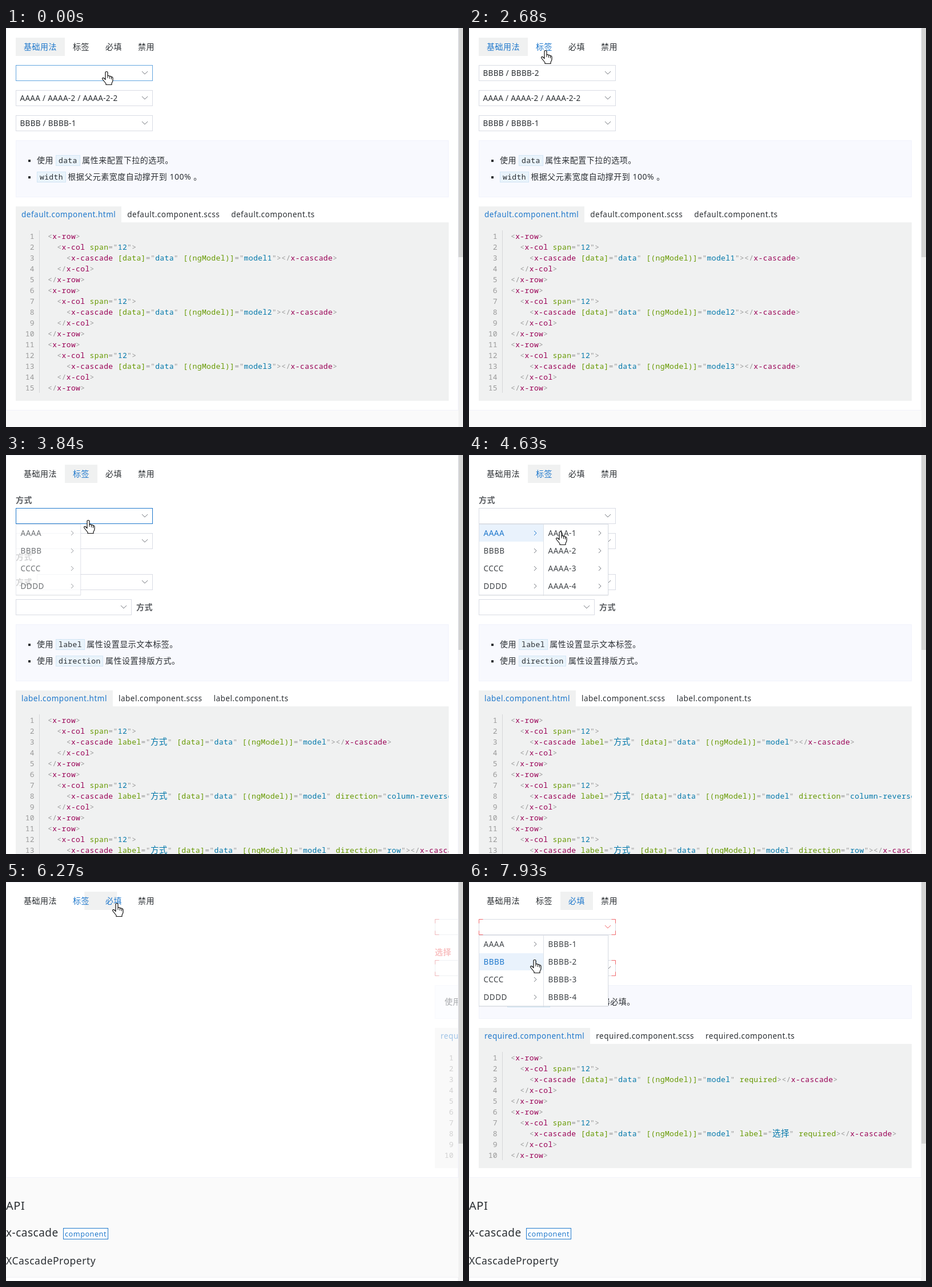
Write an HTML page with a canvas that moves like this. It is 800x700 px and loops after 8 s.

```html
<!DOCTYPE html>
<html lang="zh">
<head>
<meta charset="utf-8">
<style>
html, body { margin: 0; width: 100%; height: 100%; overflow: hidden; }
canvas { display: block; }
</style>
</head>
<body>
<canvas width="800" height="700"></canvas>
<script>
const ctx = document.querySelector('canvas').getContext('2d');
const BLUE = '#1f78cc', INK = '#2b2f33', RED = '#f0686c', LINE = '#d9dce4', PANEL = '#f0f1f1';
const GREY = '#999', ICON = '#74787f';
const sans = (size, weight = '') => `${weight} ${size}px "Noto Sans", "Noto Sans CJK SC", sans-serif`;
const mono = size => `${size}px "Noto Sans Mono", "Noto Sans CJK SC", monospace`;
const hasHan = s => /[\u3000-\u9fff]/.test(s);
const clamp = v => Math.min(1, Math.max(0, v));
const ease = u => u < .5 ? 4 * u ** 3 : 1 - (2 - 2 * u) ** 3 / 2;
const mix = (a, b, u) => a + (b - a) * u;

const tabs = [['基础用法', 17, 86], ['标签', 103, 57], ['必填', 160, 57], ['禁用', 217, 57]];
const model = '[data]="data" [(ngModel)]="model"';
const pages = [
  { name: 'default', noteY: 197, thumb: 402,
    boxes: [[17, 65, 240], [17, 109, 240], [17, 153, 240]], labels: [],
    values: t => [t < 1660 ? '' : 'BBBB / BBBB-2', 'AAAA / AAAA-2 / AAAA-2-2', 'BBBB / BBBB-1'],
    notes: ['使用`data`属性来配置下拉的选项。', '`width`根据父元素宽度自动撑开到 100% 。'],
    rows: [1, 2, 3].map(i => model.replace('model"', `model${i}"`)) },
  { name: 'label', noteY: 297, thumb: 342,
    boxes: [[17, 93, 240], [17, 137, 240], [54, 209, 203], [17, 253, 203]],
    labels: [['方式', 17, 79], ['方式', 17, 179], ['方式', 17, 223], ['方式', 228, 267]],
    values: t => Array(4).fill(t < 5240 ? '' : 'AAAA / AAAA-1 / AAAA-1-2'),
    notes: ['使用`label`属性设置显示文本标签。', '使用`direction`属性设置排版方式。'],
    rows: ['', 'column-reverse', 'row', 'row-reverse'].map(d =>
      `label="方式" ${model}` + (d && ` direction="${d}"`)) },
  { name: 'required', noteY: 181, thumb: 459, required: true,
    boxes: [[17, 65, 240], [17, 137, 240]], labels: [['选择', 17, 123]],
    values: () => ['', ''],
    notes: ['使用`required`属性设置选择器必填。'],
    rows: [`${model} required`, `${model} label="选择" required`] }
];
for (const p of pages) {
  p.code = p.rows.flatMap(a => ['<x-row>', '  <x-col span="12">',
    `    <x-cascade ${a}></x-cascade>`, '  </x-col>', '</x-row>']);
  p.fileY = p.noteY + (p.notes.length > 1 ? 100 : 59) + 16;
  p.codeH = 47 + 19 * (p.code.length - 1);
  p.bottom = p.fileY + 28 + p.codeH + 16;
}

const clicks = [2760, 6020];   // tab changes
const menus = [                // steps: [time, open path]
  { page: 0, open: 470, close: 1680, steps: [[860, [0]], [1230, [1]], [1540, [1, 1]]] },
  { page: 1, open: 3700, close: 5250, steps: [[4280, [0]], [4760, [0, 0]], [5040, [0, 0, 1]], [5240, [0, 0]]] },
  { page: 2, open: 7140, close: 9000, steps: [[7540, [0]], [7770, [1]]] }
];
const track = [
  [0, 176, 76], [69, 176, 76], [70, 170, 78], [470, 170, 78], [640, 166, 82], [900, 124, 102],
  [1120, 112, 114], [1240, 112, 114], [1430, 103, 133], [1560, 150, 137], [1640, 165, 139],
  [1960, 165, 139], [2300, 156, 95], [2620, 134, 39], [3260, 134, 39], [3580, 146, 108],
  [3700, 146, 110], [3840, 144, 114], [4160, 108, 126], [4290, 108, 126], [4630, 160, 134],
  [4760, 160, 134], [5150, 262, 160], [5390, 262, 160], [5560, 175, 61], [5640, 175, 61],
  [5880, 194, 37], [6730, 194, 37], [7000, 178, 87], [7140, 178, 87], [7400, 170, 90],
  [7620, 124, 110], [7930, 115, 136], [8000, 115, 136]
];
const hand = new Path2D('M-2 2.5Q-2 .5 0 .5T2 2.5V8Q5 7 5.5 9Q8 8 8.5 10Q11 9.5 11 12V16Q11 18 9 21V23.5H-1V21.5Q-3 19-7 14Q-8 12-6.5 11.5T-2 14.5Z');
const arrow = new Path2D('M.5 .5V16.5L4.2 13L6.8 19L9.3 18L6.8 12H12Z');

function rect(x, y, w, h, fill, stroke) {
  if (fill) { ctx.fillStyle = fill; ctx.fillRect(x, y, w, h); }
  if (stroke) {
    ctx.strokeStyle = stroke; ctx.lineWidth = 1;
    ctx.strokeRect(x + .5, y + .5, w - 1, h - 1);
  }
}

function line(color, ...pts) {
  ctx.strokeStyle = color; ctx.lineWidth = 1;
  ctx.beginPath();
  pts.forEach(p => ctx.lineTo(...p));
  ctx.stroke();
}

function clipped(x, y, w, h, paint) {
  ctx.save();
  ctx.beginPath(); ctx.rect(x, y, w, h); ctx.clip();
  paint();
  ctx.restore();
}

// Writes text centred on y and returns its right end.
function write(s, x, y, color = INK, font = sans(hasHan(s) ? 14 : 13.5), gap = .5) {
  ctx.font = font; ctx.letterSpacing = gap + 'px'; ctx.fillStyle = color;
  ctx.fillText(s, x, y + 5);
  return x + ctx.measureText(s).width;
}

const writeCode = (s, x, y, color) => write(s, x, y - .5, color, mono(hasHan(s) ? 14.5 : 13), .38);

function codeLine(s, x, y) {
  const put = (part, color) => { x = writeCode(part, x, y, color); };
  for (const m of s.matchAll(/(<\/?)([\w-]+)|="([^"]*)"|>|\s+|[^\s=>]+/g)) {
    if (m[1]) { put(m[1], GREY); put(m[2], '#905'); }
    else if (m[3] !== undefined) { put('="', GREY); put(m[3], '#07a'); put('"', GREY); }
    else put(m[0], m[0] === '>' ? GREY : '#690');
  }
}

function note(s, x, y) {
  s.split('`').forEach((part, i) => {
    if (!part) return;
    if (i % 2) {
      if (s[0] !== '`') x += 4;
      const w = part.length * 8.16 + 10;
      rect(Math.round(x), y - 9, Math.round(w), 19, '#e9f3fb', '#d3e6f5');
      writeCode(part, x + 5, y, INK);
      x += w + 3.5;
    } else x = write(part, x, y);
  });
}

function select([x, y, w], value, required, over, open) {
  const h = 28, r = x + w, c = y + 14;
  const tint = required ? '#f5a3a5' : open ? BLUE : '#64a6e0';
  rect(x, y, w, h, '#fff', over ? tint : LINE);
  if (required) for (const [cx, sx] of [[x + .5, 1], [r - .5, -1]])
    for (const [cy, sy] of [[y + .5, 1], [y + h - .5, -1]])
      line(RED, [cx + 7 * sx, cy], [cx, cy], [cx, cy + 7 * sy]);
  clipped(x, y, w - 29, h, () => write(value, x + 7.5, c, INK, sans(13.5), .3));
  line(required && (over || open) ? RED : ICON, [r - 19, c - 3], [r - 14, c + 2], [r - 9, c - 3]);
}

function content(p, t, tip, menu) {
  p.labels.forEach(([s, x, y]) => write(s, x, y, p.required ? RED : '#5c5f63', sans(14, 'bold')));
  const values = p.values(t);
  p.boxes.forEach((b, i) => {
    const open = menu && i === 0;
    select(b, values[i], p.required, (!menu || open) && inside(tip, ...b, 28), open);
  });

  rect(17, p.noteY, 758, p.fileY - 16 - p.noteY, '#f8f9fe', '#f1f3fb');
  p.notes.forEach((s, i) => {
    const y = p.noteY + (p.notes.length > 1 ? 35 : 29) + 29 * i;
    if (p.notes.length > 1) rect(39, y - 1, 4, 4, INK);
    note(s, p.notes.length > 1 ? 54 : 34, y);
  });

  const top = p.fileY + 28;
  let x = 27;
  ['html', 'scss', 'ts'].forEach((ext, i) => {
    const s = `${p.name}.component.${ext}`;
    if (!i) {
      ctx.font = sans(13.5); ctx.letterSpacing = '.5px';
      rect(17, p.fileY, Math.round(ctx.measureText(s).width) + 20, 28, PANEL);
    }
    x = write(s, x, p.fileY + 14, i ? INK : BLUE) + 20;
  });
  rect(17, top, 758, p.codeH, PANEL);
  rect(58, top + 14, 1, p.codeH - 28, '#d5d7d9');
  clipped(17, top, 758, p.codeH, () => p.code.forEach((s, i) => {
    const y = top + 24 + 19 * i, n = String(i + 1);
    writeCode(n, 50 - 8.16 * n.length, y, GREY);
    codeLine(s, 73, y);
  }));
}

const inside = ([px, py], x, y, w, h) => px >= x && px < x + w && py >= y && py < y + h;

function pathAt(m, t) {
  let path = [], since = t, size = 0;
  for (const [at, next] of m.steps) if (at <= t) {
    if (next.length > size) since = at;
    size = next.length; path = next;
  }
  return { path, since };
}

function columns(path) {
  const four = prefix => [1, 2, 3, 4].map(i => `${prefix}-${i}`);
  const list = [['AAAA', 'BBBB', 'CCCC', 'DDDD']];
  if (path.length) list.push(four(list[0][path[0]]));
  if (path.length > 1 && path[0] === 0) list.push(four(list[1][path[1]]));
  return list;
}

function drawMenu(m, t) {
  const alpha = clamp((t - m.open) / 190) * clamp(1 - (t - m.close) / 150);
  if (!alpha) return;
  const top = pages[m.page].boxes[0][1] + 28;
  const { path, since } = pathAt(m, t);
  columns(path).forEach((items, c) => {
    const x = 17 + 113 * c;
    ctx.globalAlpha = alpha * (c && c === path.length ? clamp((t - since + 40) / 140) : 1);
    rect(x, top, 114, 125, '#fff', '#dde1e8');
    rect(x, top + 125, 114, 1, 'rgba(0,0,0,.08)');
    rect(x + 114, top, 1, 125, 'rgba(0,0,0,.04)');
    items.forEach((s, i) => {
      const y = top + 16 + 31 * i, on = path[c] === i;
      if (on) rect(x + 1, y - 15, 112, 30, '#e9f2fc');
      write(s, x + 8.5, y, on ? BLUE : '#3f4347');
      if (!c || (c === 1 && path[0] === 0))
        line(on ? BLUE : ICON, [x + 97, y - 4], [x + 101, y], [x + 97, y + 4]);
    });
  });
  ctx.globalAlpha = 1;
}

function footer(y) {
  write('API', 0, y + 52, INK, sans(20));
  write('x-cascade', 0, y + 99, INK, sans(19));
  rect(100, y + 89, 79, 20, '#fff', BLUE);
  write('component', 103, y + 99, BLUE, sans(12.7));
  write('XCascadeProperty', 0, y + 148, INK, sans(17.5));
  rect(0, y + 175, 792, 30, '#fff', '#f0f0f4');
}

function tipAt(t) {
  const i = Math.max(1, track.findIndex(k => k[0] > t));
  const [a, b] = [track[i - 1], track[i]], u = (t - a[0]) / (b[0] - a[0]);
  return [mix(a[1], b[1], u), mix(a[2], b[2], u)];
}

function draw(t) {
  const tip = tipAt(t);
  const tab = clicks.filter(c => c <= t).length;
  const dt = tab ? t - clicks[tab - 1] : 1e4;
  const leaving = dt < 160, page = pages[leaving ? tab - 1 : tab];
  const menu = menus.find(m => t >= m.open && t < m.close);

  rect(0, 0, 800, 700, '#fafafa');
  rect(0, 0, 792, page.bottom + 1, '#fff', '#f1f2fa');

  const from = tabs[Math.max(0, tab - 1)], to = tabs[tab], slide = ease(clamp((dt - 90) / 300));
  rect(mix(from[1], to[1], slide), 17, mix(from[2], to[2], slide), 32, PANEL);
  let overTab = false;
  tabs.forEach(([s, x, w], i) => {
    const over = inside(tip, x, 17, w, 32);
    overTab = overTab || over;
    const active = i === tab || (i === tab - 1 && dt < 320);
    write(s, x + 14, 33, over || active ? BLUE : INK);
  });

  clipped(0, 0, 791, 700, () => {
    ctx.globalAlpha = leaving ? 1 - dt / 160 : clamp((dt - 160) / 220);
    if (!leaving) ctx.translate(758 * (1 - ease(clamp((dt - 191) / 300))), 0);
    content(page, t, tip, menu);
  });
  footer(page.bottom);
  menus.forEach(m => drawMenu(m, t));

  rect(792, 0, 8, 700, '#f1f1f1');
  rect(792, 0, 8, page.thumb, '#d3d3d3');

  const overMenu = menu && inside(tip, 17, pages[menu.page].boxes[0][1] + 28,
    113 * columns(pathAt(menu, t).path).length, 125);
  const pointing = overTab || overMenu || page.boxes.some(b => inside(tip, ...b, 28));
  ctx.save();
  ctx.translate(...tip.map(Math.round));
  ctx.fillStyle = '#fff'; ctx.strokeStyle = '#111'; ctx.lineWidth = 1.2; ctx.lineJoin = 'round';
  const shape = pointing ? hand : arrow;
  ctx.fill(shape); ctx.stroke(shape);
  if (pointing) for (const [x, y] of [[2, 8], [5.5, 9], [8.5, 10]]) line('#111', [x, y], [x, y + 4]);
  ctx.restore();
}

const start = performance.now();
(function tick() {
  draw((performance.now() - start) % 8000);
  requestAnimationFrame(tick);
})();
</script>
</body>
</html>
```
